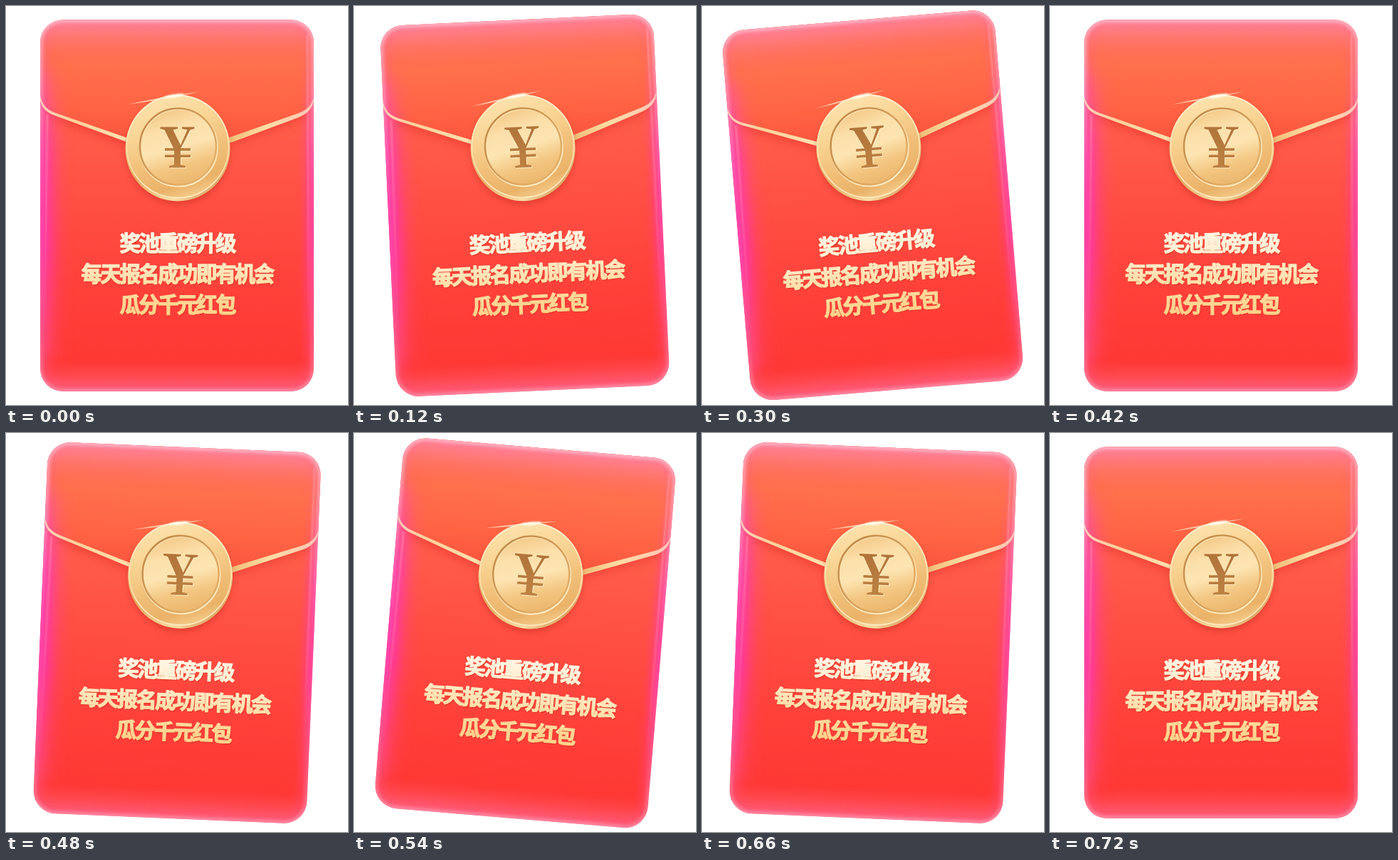
An HTML page with a canvas for the animation above (0.79 s loop, 480 by 559 pixels).

```html
<!DOCTYPE html>
<html lang="zh-CN">
<head>
<meta charset="utf-8">
<title>红包</title>
<style>
html, body { margin: 0; width: 100%; height: 100%; overflow: hidden; background: #fff; }
canvas { display: block; }
</style>
</head>
<body>
<canvas id="stage" width="480" height="559"></canvas>
<script>
const ctx = document.getElementById('stage').getContext('2d');
const LOOP = 790, STEP = 30, LAST = 24, SWING = 6;
const PIVOT = { x: 233, y: 284 };
const COIN = { x: 241, y: 198 };

const card = new Path2D();
card.roundRect(48, 19.5, 384, 520.5, 32);

const flap = new Path2D('M48 0V125C50 140 55 147 70 153L168 188Q241 214 314 188L411 153C425 147 430 140 432 127V0Z');
const flapRim = new Path2D(
  'M47 122C50 138 56 145 70 150L168 184Q241 208 314 184L411 150C424 145 430 138 433 124' +
  'V129C430 143 425 150 411 156L314 192Q241 217 168 190L70 154C56 149 50 143 47 128Z');

const yen = new Path2D(
  'M216.5 169.5H241V172L234.5 173.5L245 195L254.5 173.5L247 172V169.5H264.5V172L258.5 173.5L245 200' +
  'V222.5L252 224V226.5H229V224L236 222.5V201L222.5 173.5L216.5 172Z' +
  'M223 199.3H259V202.8H223ZM223 208.5H259V212H223Z');

function gradient(x0, y0, x1, y1, ...stops) {
  const g = ctx.createLinearGradient(x0, y0, x1, y1);
  stops.forEach(([at, color]) => g.addColorStop(at, color));
  return g;
}

function layer(draw, blur = 0) {
  ctx.save();
  if (blur) ctx.filter = `blur(${blur}px)`;
  draw();
  ctx.restore();
}

function line(path, color, width) {
  ctx.strokeStyle = color;
  ctx.lineWidth = width;
  ctx.stroke(path);
}

function fill(path, color) {
  ctx.fillStyle = color;
  ctx.fill(path);
}

function circle(x, y, r) {
  const path = new Path2D();
  path.arc(x, y, r, 0, 2 * Math.PI);
  return path;
}

const disc = (x, y, r, color) => fill(circle(x, y, r), color);
const ring = (x, y, r, color, width) => line(circle(x, y, r), color, width);

function drawGlow() {
  // Wide pink light from the top, magenta from the sides.
  fill(card, gradient(0, 19, 0, 78,
    [0, 'rgba(255,150,175,.8)'], [0.35, 'rgba(255,135,150,.5)'], [1, 'rgba(255,110,90,0)']));
  fill(card, gradient(0, 495, 0, 540, [0, 'rgba(255,80,90,0)'], [1, 'rgba(255,110,140,.65)']));

  const sides = gradient(0, 60, 0, 520,
    [0, 'rgba(255,100,140,.4)'], [0.3, 'rgba(255,65,165,.9)'], [0.6, 'rgba(255,55,165,.9)'],
    [1, 'rgba(255,80,125,.5)']);
  layer(() => line(new Path2D('M46 90V500'), sides, 42), 13);
  layer(() => line(card, sides, 20), 7);

  const edge = gradient(0, 20, 0, 540,
    [0, 'rgba(255,205,220,.7)'], [0.22, 'rgba(255,170,205,.6)'], [0.5, 'rgba(255,110,190,.3)'],
    [0.85, 'rgba(255,130,170,.4)'], [1, 'rgba(255,175,195,.6)']);
  layer(() => line(card, edge, 7), 2.5);

  const seam = gradient(0, 140, 0, 480,
    [0, 'rgba(255,180,200,.55)'], [0.5, 'rgba(255,150,185,.4)'], [1, 'rgba(255,130,160,0)']);
  layer(() => line(new Path2D('M58 152L54 480M423 40L425 480'), seam, 2), 0.8);
}

function drawEnvelope() {
  ctx.save();
  ctx.clip(card);

  fill(card, gradient(0, 150, 0, 540,
    [0, '#ff604c'], [0.3, '#ff5044'], [0.6, '#ff423b'], [0.9, '#fe3834'], [1, '#ff444a']));
  layer(() => {
    ctx.translate(0, 7);
    fill(flap, 'rgba(226,40,36,.5)');
  }, 7);
  fill(flap, gradient(0, 20, 0, 205,
    [0, '#ff6a5c'], [0.35, '#ff704c'], [0.65, '#ff6444'], [1, '#f9503d']));
  drawGlow();
  fill(flapRim, gradient(48, 0, 432, 0,
    [0, '#ffd0bb'], [0.12, '#ffd09a'], [0.33, '#ffe3b0'], [0.67, '#edb870'],
    [0.82, '#ffdca3'], [1, '#ffc6b8']));
  ctx.restore();
}

function drawCoin() {
  const { x, y } = COIN;
  layer(() => disc(x, y + 7, 72, 'rgba(190,40,25,.5)'), 5);
  disc(x, y + 2, 73.5, gradient(170, 150, 300, 265,
    [0, '#f8d294'], [0.4, '#e5a860'], [0.75, '#fbdca2'], [1, '#d18c48']));
  disc(x, y - 1, 72.5, gradient(215, 125, 262, 270,
    [0, '#fde3ae'], [0.3, '#f9d595'], [0.6, '#f1bf79'], [0.85, '#eab268'], [1, '#f6cf90']));
  ring(x, y - 1, 71.6, gradient(0, 125, 0, 270, [0, '#fff3d2'], [0.6, '#fbdca4'], [1, '#ffebc0']), 1.8);
  disc(x + 0.5, y - 1, 54, gradient(225, 145, 255, 250,
    [0, '#f3c987'], [0.25, '#fcdfa9'], [0.5, '#fde5b3'], [0.75, '#f3c681'], [1, '#ebb66d']));
  ring(x + 1.2, y + 0.3, 54, '#ffeabd', 3);
  ring(x + 0.5, y - 1, 53.5, gradient(195, 150, 290, 245,
    [0, '#bf8746'], [0.5, '#d6a05b'], [1, '#e6b56f']), 2.6);

  layer(() => {
    ctx.translate(1, 1);
    fill(yen, '#ffebbd');
  });
  fill(yen, gradient(0, 169, 0, 227, [0, '#b0743a'], [1, '#bd8142']));

  const glint = new Path2D('M171 138Q218 127 272 120Q229 130 171 138Z');
  layer(() => fill(glint, 'rgba(255,232,200,.75)'), 0.6);
  layer(() => {
    ctx.translate(236, 126);
    ctx.rotate(-0.17);
    ctx.scale(1, 0.16);
    disc(0, 0, 14, '#fffbea');
  }, 1.2);
}

function drawText() {
  ctx.font = '900 29.5px "Noto Sans CJK SC", "Noto Sans CJK", sans-serif';
  ctx.letterSpacing = '-2.6px';
  ctx.textAlign = 'center';
  ctx.textBaseline = 'alphabetic';
  ctx.lineJoin = 'round';
  const ink = gradient(0, 316, 0, 435, [0, '#fff6e4'], [0.3, '#ffedcd'], [0.6, '#ffdfa8'], [1, '#ffd087']);
  ['奖池重磅升级', '每天报名成功即有机会', '瓜分千元红包'].forEach((text, i) => {
    const y = 343 + 43 * i;
    ctx.fillStyle = 'rgba(198,45,25,.5)';
    ctx.fillText(text, 241.3, y + 1.8);
    ctx.strokeStyle = ctx.fillStyle = ink;
    ctx.lineWidth = 1.3;
    ctx.strokeText(text, 240.1, y);
    ctx.fillText(text, 240.1, y);
  });
}

// Slow swing left, then an even swing to the right and back.
function angleAt(step) {
  if (step <= 9) return -SWING * step / 9;
  if (step <= 19) return SWING * (step - 14) / 5;
  return SWING * (LAST - step) / 5;
}

function draw(step) {
  ctx.clearRect(0, 0, 480, 559);
  ctx.save();
  ctx.translate(PIVOT.x, PIVOT.y);
  ctx.rotate(angleAt(step) * Math.PI / 180);
  ctx.translate(-PIVOT.x, -PIVOT.y);
  drawEnvelope();
  drawCoin();
  drawText();
  ctx.restore();
}

let shown = -1;
const start = performance.now();

function tick() {
  const time = Math.max(0, performance.now() - start) % LOOP;
  const step = Math.min(LAST, Math.floor(time / STEP));
  if (step !== shown) draw(shown = step);
  requestAnimationFrame(tick);
}
tick();
</script>
</body>
</html>
```
